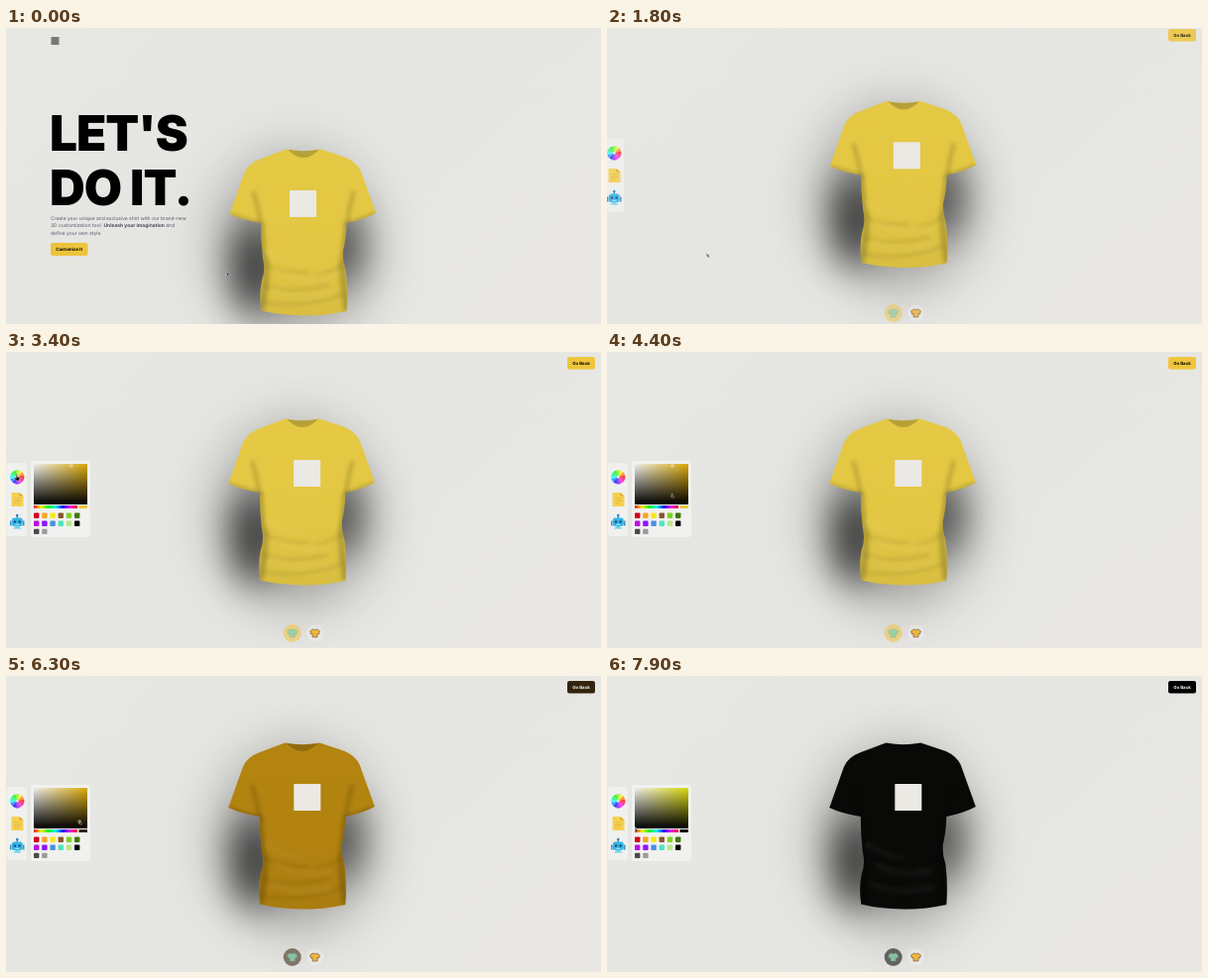
An HTML page that plays this animation: 600x299 px, repeating every 8 s.

```html
<!DOCTYPE html>
<html lang="en">
<head>
<meta charset="utf-8">
<title>Shirt customizer</title>
<style>
  html, body { margin: 0; width: 100%; height: 100%; overflow: hidden; background: #e6e5e2; }
  svg { display: block; width: 100%; height: 100%; }
  text { font-family: Inter, "Liberation Sans", sans-serif; text-rendering: geometricPrecision; }
  .head { font-size: 49.5px; font-weight: 900; letter-spacing: -.02em; }
  .copy { font-size: 4.95px; fill: #545a66; }
  .btn { font-size: 4.4px; font-weight: 700; text-anchor: middle; }
</style>
</head>
<body>
<svg viewBox="0 0 600 299">
  <defs>
    <linearGradient id="wall" x2="1" y2=".5">
      <stop stop-color="#e7e7e4"/><stop offset=".5" stop-color="#e5e5e2"/><stop offset="1" stop-color="#e8e7e4"/>
    </linearGradient>
    <linearGradient id="fall" x2="0" y2="1">
      <stop stop-opacity="0"/><stop offset=".6" stop-opacity=".01"/><stop offset="1" stop-opacity=".06"/>
    </linearGradient>
    <linearGradient id="toWhite">
      <stop stop-color="#eee"/><stop offset="1" stop-color="#eee" stop-opacity="0"/>
    </linearGradient>
    <linearGradient id="toBlack" x2="0" y2="1"><stop stop-opacity="0"/><stop offset="1"/></linearGradient>
    <linearGradient id="hues"></linearGradient>
    <filter id="soft" filterUnits="userSpaceOnUse" x="200" y="50" width="200" height="200"><feGaussianBlur stdDeviation="2"/></filter>
    <filter id="near" x="-200%" y="-100%" width="500%" height="300%"><feGaussianBlur stdDeviation="18"/></filter>
    <filter id="far" x="-100%" y="-100%" width="300%" height="300%"><feGaussianBlur stdDeviation="30"/></filter>
    <path id="outline" d="M282.500 67.500Q300 71 317.500 67.500L343 76Q354 81 358 90L373 132Q362 138 343.500 142Q343 158 340 170Q339 180 342.500 190Q345 208 343.500 231Q320 236 300 235.500Q275 235 257.500 230.500Q255 214 258 200Q262 190 259 177Q257 160 257 142Q238 139 225.500 133L240 92Q244 82 256 77.500Z"/>
    <clipPath id="shirtClip"><use href="#outline"/></clipPath>
    <path id="tee" d="M-2-4Q0-2.500 2-4L5-2 4 1 2.500 .5V4H-2.500V.5L-4 1-5-2Z"/>
  </defs>

  <rect width="600" height="299" fill="url(#wall)"/>

  <g id="scene">
    <ellipse cx="292" cy="165" rx="72" ry="86" opacity=".38" filter="url(#far)"/>
    <ellipse cx="250" cy="188" rx="20" ry="46" opacity=".72" filter="url(#near)"/>
    <ellipse cx="338" cy="166" rx="18" ry="38" opacity=".6" filter="url(#near)"/>
    <g id="shirt">
      <use id="cloth" href="#outline"/>
      <g clip-path="url(#shirtClip)">
        <rect x="220" y="60" width="160" height="180" fill="url(#fall)"/>
        <g fill="none" stroke="#000" filter="url(#soft)">
          <path d="M257 142Q258 166 261 180T257 231M344 142Q342 166 340 178T344 231" stroke-width="7" opacity=".2"/>
          <path d="M257 144Q254 124 249 110M344 144Q346 124 351 110" stroke-width="4" opacity=".18"/>
          <path d="M225 134L257 143M373 133L344 143" stroke-width="3" opacity=".25"/>
          <path d="M260 182Q276 195 306 192M260 204Q284 216 326 204M258 221Q290 230 340 214M340 183Q326 194 312 196" stroke-width="3" opacity=".11"/>
          <path d="M264 170Q280 182 300 184M268 211Q292 222 330 212M272 191Q292 204 330 197" stroke="#fff" stroke-width="3" opacity=".06"/>
        </g>
        <path d="M282.500 66Q300 86 317.500 66Z" opacity=".2"/>
      </g>
      <rect id="print" x="286" y="109" width="27" height="27" fill="#ebe9e4"/>
    </g>
  </g>

  <g id="home">
    <rect x="45.500" y="9" width="8" height="8" fill="#777"/>
    <g class="head"><text x="44" y="123.800">LET'S</text><text x="44" y="179">DO IT.</text></g>
    <g class="copy">
      <text x="45" y="193.800">Create your unique and exclusive shirt with our brand-new</text>
      <text x="45" y="201.300">3D customization tool. <tspan font-weight="700" fill="#454b58">Unleash your imagination</tspan> and</text>
      <text x="45" y="208.800">define your own style.</text>
    </g>
    <rect x="45" y="217" width="37.500" height="13" rx="2" fill="#edc33c"/>
    <text class="btn" x="63.600" y="225.100">Customize It</text>
  </g>

  <g id="tabs">
    <rect x="1" y="112" width="20" height="74" rx="3" fill="#fff" opacity=".38"/>
    <g id="wheel" transform="translate(11.300 126.300)"></g>
    <path d="M5.500 142h8l4 3.500V156h-12Z" fill="#f5d052"/>
    <path d="M13.500 142v3.500h4Z" fill="#d9ac35"/>
    <path d="M8 148h7M8 150.500h7M8 153h5" stroke="#dcae3c" stroke-width=".7"/>
    <g transform="translate(11.300 171.500)">
      <path d="M0-7V-3M-6.500-1V4M6.500-1V4" stroke="#2382b5" stroke-width="1.300"/>
      <circle cy="-6.500" r="1.300" fill="#2e83c4"/>
      <rect x="-5.500" y="-4" width="11" height="8.500" rx="2.500" fill="#35b5e6"/>
      <path d="M-4 7Q-3 4.500 0 4.500Q3 4.500 4 7Z" fill="#65cfe8"/>
      <circle cx="-2.300" r="1.200" fill="#174b77"/><circle cx="2.300" r="1.200" fill="#174b77"/>
      <path d="M-2 2.800H2" stroke="#d9f5ff" stroke-width=".8"/>
    </g>
  </g>

  <g id="panel">
    <rect x="25" y="110" width="60" height="77" rx="2.500" fill="#fff" opacity=".42"/>
    <rect id="hueBox" x="28" y="113" width="54" height="41"/>
    <rect x="28" y="113" width="54" height="41" fill="url(#toWhite)"/>
    <rect x="28" y="113" width="54" height="41" fill="url(#toBlack)"/>
    <rect x="28" y="155" width="44" height="3" fill="url(#hues)"/>
    <rect id="picked" x="73.500" y="155" width="8.500" height="3"/>
    <g id="swatches"></g>
    <circle id="ring" r="1.300" fill="none" stroke="#fff" stroke-width=".5"/>
  </g>

  <g id="back">
    <rect id="backBox" x="566" y="5" width="28" height="12.500" rx="2"/>
    <text id="backText" class="btn" x="580" y="12.800">Go Back</text>
  </g>

  <g id="filters">
    <circle id="activeFilter" cx="288.700" cy="284" r="9" opacity=".56"/>
    <use href="#tee" x="288.700" y="284" fill="#8fd0ac" stroke="#76aaa0" stroke-width=".5" opacity=".85"/>
    <circle cx="311.500" cy="284" r="8.500" fill="#fff" opacity=".25"/>
    <use href="#tee" x="311.500" y="284" fill="#efb443" stroke="#69502b" stroke-width=".6"/>
  </g>

  <path id="arrow" d="M0 0V4.200L1-.1 1 3.300 1.700 4.700 2.400 4.400 1.800 3H3.100Z" fill="#000" stroke="#fff" stroke-width=".25"/>
  <path id="hand" d="M-.7-2Q0-3 .5-2V0L2.600 .7Q3 2 2.200 4H-.8L-2.400 1.500Q-2 .5-.7 1.500Z" fill="#111" stroke="#fff" stroke-width=".35"/>
</svg>
<script>
const DURATION = 8000;
const $ = id => document.getElementById(id);
const clamp = v => Math.max(0, Math.min(1, v));
const smooth = v => v * v * (3 - 2 * v);
const settle = (t, start, tau) => t < start ? 0 : 1 - Math.exp(-(t - start) / tau);
const set = (id, attrs) => { for (const k in attrs) $(id).setAttribute(k, attrs[k]); };

// Eased interpolation through [time, ...values] stops.
function track(stops, t) {
  const i = stops.findIndex(s => s[0] > t);
  if (i === 0) return stops[0].slice(1);
  if (i < 0) return stops[stops.length - 1].slice(1);
  const a = stops[i - 1], b = stops[i];
  const k = smooth((t - a[0]) / (b[0] - a[0]));
  return a.slice(1).map((v, n) => v + (b[n + 1] - v) * k);
}
const rgb = c => `rgb(${c.map(Math.round).join()})`;

const pointer = [[0, 222, 247], [250, 215, 247], [1000, 63, 228], [1550, 63, 228], [2400, 241, 230],
  [2600, 241, 230], [3250, 11, 126], [3550, 11, 126], [4250, 65, 144], [4500, 65, 144],
  [4950, 76, 120], [5500, 76, 120], [6200, 74, 147], [6500, 74, 147], [7500, 28, 154]];
const turn = [[0, 0], [900, 0], [1400, .2], [1700, .7], [2400, 0], [2700, 0], [3500, 1]];
const clothColor = [[0, 229, 201, 68], [4700, 229, 201, 68], [5200, 220, 182, 36],
  [5900, 216, 176, 30], [6300, 180, 132, 16], [6700, 62, 46, 8], [7200, 9, 9, 7]];
const pickColor = [[0, 239, 197, 60], [4650, 239, 197, 60], [5000, 212, 171, 32],
  [5600, 212, 171, 32], [6200, 52, 39, 12], [6900, 10, 9, 4], [7400, 0, 0, 0]];
const hueColor = [[0, 218, 170, 6], [6600, 218, 170, 6], [7500, 216, 216, 10]];

const hue = (h, light = 52) => `hsl(${h} 90% ${light}%)`;
$("hues").innerHTML = Array.from({ length: 7 }, (_, i) =>
  `<stop offset="${i / 6}" stop-color="${hue(i * 60)}"/>`).join("");
$("wheel").innerHTML = Array.from({ length: 12 }, (_, i) =>
  `<path d="M0 0L-1.85-6.900Q0-7.300 1.850-6.900Z" fill="${hue(90 - i * 30, 60)}" transform="rotate(${i * 30})"/>`).join("") +
  '<circle r="1.200" fill="#eee"/>';
$("swatches").innerHTML = ("#d0021b #f5a623 #f8e71c #8b572a #7ed321 #417505 #bd10e0 #9013fe #4a90e2 " +
  "#50e3c2 #b8e986 #000 #4a4a4a #9b9b9b").split(" ").map((c, i) =>
  `<rect x="${28 + i % 6 * 8.2}" y="${162.5 + Math.floor(i / 6) * 8.1}" width="5.400" height="5.400" rx=".8" fill="${c}"/>`).join("");

function slide(id, amount, dx, dy) {
  const rest = 1 - amount;
  set(id, { transform: `translate(${dx * rest} ${dy * rest})`, opacity: amount });
}

function render(t) {
  const [x, y] = track(pointer, t);
  const [r] = track(turn, t);
  const lift = settle(t, 1480, 150);
  set("scene", { transform: `translate(0 ${55 * (1 - lift)})` });
  set("shirt", { transform: `translate(${-1.2 * r} 0)` });
  set("print", { transform: `translate(${5.5 * r} ${-2 * r * (1 - lift)})` });

  slide("home", 1 - clamp((t - 1480) / 180), -40, 0);
  const enter = settle(t, 1620, 90);
  slide("tabs", enter, -30, 0);
  slide("back", enter, 0, -30);
  slide("filters", enter, 0, 30);
  set("panel", { opacity: t < 3400 ? 0 : 1 });

  const picked = track(pickColor, t), fill = rgb(picked);
  set("cloth", { fill: rgb(track(clothColor, t)) });
  for (const id of ["backBox", "picked", "activeFilter"]) set(id, { fill });
  set("backText", { fill: picked[0] < 130 ? "#fff" : "#000" });
  set("hueBox", { fill: rgb(track(hueColor, t)) });
  const dragging = t > 4900;
  set("ring", { cx: dragging ? x : 66, cy: dragging ? y : 115 });

  const overButton = t > 900 && t < 1620 || t > 3180 && t < 3650;
  set("arrow", { transform: `translate(${x} ${y - 1})`, opacity: overButton ? 0 : 1 });
  set("hand", { transform: `translate(${x} ${y})`, opacity: overButton ? 1 : 0 });
}

const start = performance.now();
function tick() {
  render((performance.now() - start) % DURATION);
  requestAnimationFrame(tick);
}
render(0);
requestAnimationFrame(tick);
</script>
</body>
</html>
```
